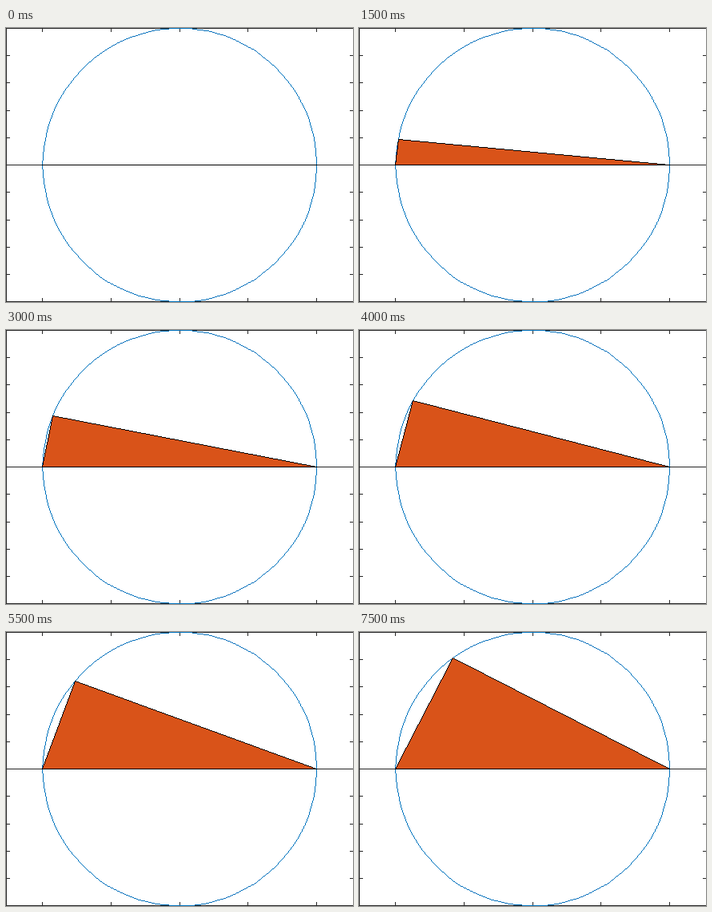
A matplotlib script for the animation above (8000 ms loop, 434 px wide and 343 px high).

```python
import numpy as np
import matplotlib.pyplot as plt
from matplotlib.animation import FuncAnimation
from matplotlib.colors import to_rgb

W, H, DPI = 434, 343, 100
CX, CY, R = 216.7, 171.05, 171.25
FRAMES, POINTS, TICK = 16, 100, 4
STEP = 2 * np.pi / (POINTS - 1)
BLUE, ORANGE, AXIS, BLACK = map(to_rgb, ("#0072BD", "#D95319", "#262626", "#000000"))


def to_px(x, y):
    """Unit-circle coordinates to the nearest pixel."""
    return round(CX + R * x), round(CY - R * y)


def on_circle(angle):
    """Pixel at an angle measured clockwise from the left end."""
    return to_px(-np.cos(angle), np.sin(angle))


def line(img, p, q, color):
    """One-pixel line without smoothing."""
    n = max(abs(q[0] - p[0]), abs(q[1] - p[1])) + 1
    x = np.rint(np.linspace(p[0], q[0], n)).astype(int)
    y = np.rint(np.linspace(p[1], q[1], n)).astype(int)
    seen = (x >= 0) & (x < W) & (y >= 0) & (y < H)
    img[y[seen], x[seen]] = color


def path(img, pts, color):
    for p, q in zip(pts, pts[1:]):
        line(img, p, q, color)


def fill_triangle(img, a, b, c, color):
    """Fill a triangle given clockwise on screen."""
    y, x = np.mgrid[:H, :W]
    inside = np.ones((H, W), bool)
    for p, q in ((a, b), (b, c), (c, a)):
        inside &= (q[0] - p[0]) * (y - p[1]) >= (q[1] - p[1]) * (x - p[0])
    img[inside] = color


def draw_base():
    img = np.ones((H, W, 3))
    mid = round(CY)
    # The right edge of the box lies just outside the stage
    path(img, [(W, 0), (0, 0), (0, H - 1), (W, H - 1)], AXIS)
    line(img, (0, mid), (W, mid), AXIS)
    for u in np.arange(-2, 3) / 2:
        x, _ = to_px(u, 0)
        line(img, (x, 0), (x, TICK), AXIS)
        line(img, (x, H - 1 - TICK), (x, H - 1), AXIS)
    for v in np.arange(-4, 5) / 5:
        _, y = to_px(0, v)
        line(img, (0, y), (TICK, y), AXIS)
        line(img, (W - TICK, y), (W, y), AXIS)
    path(img, [on_circle(k * STEP) for k in range(POINTS)], BLUE)
    return img


base = draw_base()
left, right = to_px(-1, 0), to_px(1, 0)

fig = plt.figure(figsize=(W / DPI, H / DPI), dpi=DPI, facecolor="white")
ax = fig.add_axes([0, 0, 1, 1])
ax.axis("off")
stage = ax.imshow(base, interpolation="nearest", aspect="auto")


def update(i):
    img = base.copy()
    apex = on_circle(i * STEP)
    if i:
        fill_triangle(img, left, apex, right, ORANGE)
    path(img, [left, apex, right, left], BLACK)
    stage.set_data(img)
    return stage,


anim = FuncAnimation(fig, update, frames=FRAMES, interval=500,
                     repeat=True, repeat_delay=0, blit=False)
plt.show()
```
